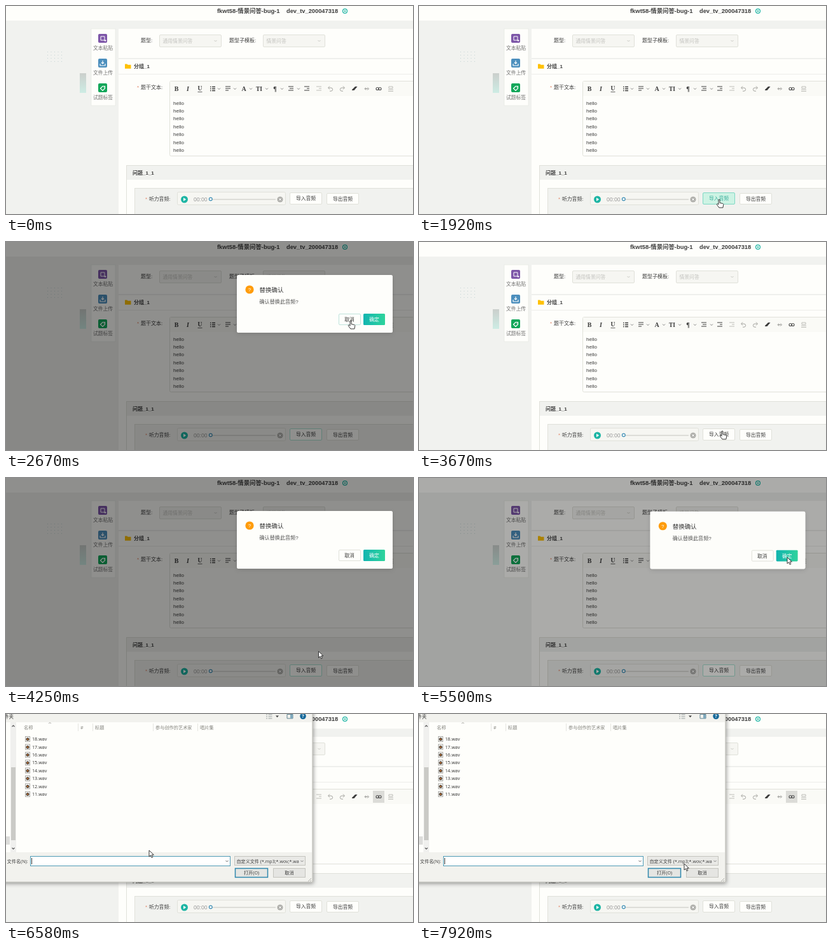
Animation, 640 px wide and 328 px high, one loop 8 s. Source, as an HTML page:

```html
<!DOCTYPE html>
<html>
<head>
<meta charset="utf-8">
<style>
html, body { margin: 0; width: 100%; height: 100%; overflow: hidden; background: #f1f2ef; }
svg { display: block; width: 640px; height: 328px; }
text { font-family: "Liberation Sans", "Noto Sans CJK SC", "Noto Sans CJK", sans-serif; white-space: pre; }
#dialog text { font-family: "Open Sans", "Noto Sans CJK SC", "Noto Sans CJK", sans-serif; }
</style>
</head>
<body>
<svg id="stage" viewBox="0 0 640 328" xmlns="http://www.w3.org/2000/svg"></svg>
<script>
const PAPER = '#fefefb', BACK = '#f1f2ef', EDGE = '#e0e1da', FIELD = '#f6f6f2', INK = '#3c3c3c', TEAL = '#1db5a4';
const LOOP = 8000;

const rect = (x, y, w, h, fill, more = '') =>
  `<rect x="${x}" y="${y}" width="${w}" height="${h}" fill="${fill}" ${more}/>`;
const box = (x, y, w, h, fill = PAPER, edge = EDGE, more = '') =>
  rect(x + .5, y + .5, w - 1, h - 1, fill, `stroke="${edge}" ${more}`);
const text = (x, y, s, size = 8, fill = INK, more = '') =>
  `<text x="${x}" y="${y}" font-size="${size}" fill="${fill}" ${more}>${s}</text>`;
const line = (d, color = INK, w = 1, more = '') =>
  `<path d="${d}" fill="none" stroke="${color}" stroke-width="${w}" ${more}/>`;
const disc = (x, y, r, fill, more = '') => `<circle cx="${x}" cy="${y}" r="${r}" fill="${fill}" ${more}/>`;
const chevron = (x, y, color = '#777', r = 2) =>
  line(`M${x - r} ${y - r / 2}l${r} ${r}l${r} ${-r}`, color, .9);
const group = (id, body, more = '') => `<g id="${id}" ${more}>${body}</g>`;
const bold = 'font-weight="700"', mid = 'text-anchor="middle"';

const bars = (x, color = INK, shift = 0) =>
  line(`M${x - 4} 127h8M${x - 4 + shift} 130h${8 - shift}M${x - 4} 133h${shift ? 8 : 5}`, color, 1.2);
const bullets = x =>
  line(`M${x - 4} 127.5h1.5m1.5 0h5M${x - 4} 130.5h1.5m1.5 0h5M${x - 4} 133.5h1.5m1.5 0h5`, INK, 1.3);

function header() {
  return rect(0, 0, 640, 23, PAPER) +
    text(332, 11, 'fkwt58-情景问答-bug-1', 9.4, INK, bold) +
    text(441, 11, 'dev_tv_200047318', 9.3, INK, bold) +
    disc(533, 8, 3.4, 'none', `stroke="${TEAL}" stroke-width="1.3"`) + disc(533, 8, 1.2, TEAL);
}

function sidebar() {
  let s = rect(134, 36, 38, 121, PAPER, `stroke="${EDGE}" stroke-width=".5"`);
  [['#7d56a8', '文本粘贴'], ['#4c8fbd', '文件上传'], ['#12a75a', '试题标签']].forEach(([color, label], i) => {
    const y = 44 + i * 39;
    s += rect(145, y, 14, 14, color, 'rx="2"') + text(152.5, y + 25, label, 7.8, '#737373', mid);
  });
  s += line('M149 48h6v6h-6zM156 53v3m-1.5-1.5h3', '#fff', 1);
  s += line('M148 91v3h8v-3M152 86v5m-2-2l2 2l2-2', '#fff', 1.1);
  s += line('M148.5 130l3.5-3.5h3.5v3.5l-3.5 3.5z', '#fff', 1.2) + disc(154, 128.3, .7, '#fff');
  for (let r = 0; r < 4; r++)
    for (let c = 0; c < 5; c++) s += rect(65 + c * 5.5, 72 + r * 5, 1, 1, '#c3d3d3');
  return s + rect(116, 106, 10, 31, 'url(#handle)');
}

function toolbar() {
  const pale = '#bdbdb8';
  const serif = 'font-weight="700" style="font-family:Liberation Serif,serif" text-anchor="middle"';
  let s = box(257, 118, 400, 119, PAPER, EDGE, 'rx="2"') + rect(258, 119, 382, 23, '#fafaf6') +
    group('hoverLink', rect(577, 121, 18, 19, '#dcdcd8'));
  s += text(268, 134, 'B', 10, INK, serif) + text(286, 134, 'I', 10, INK, serif + ' font-style="italic"') +
    text(305, 133, 'U', 9.5, INK, serif) + line('M301.5 135.5h7', INK, .8) +
    text(374, 134, 'A', 10, INK, serif) + text(398, 134, 'TI', 9.5, INK, serif) +
    text(423, 134, '¶', 10, INK, serif);
  s += bullets(325) + bars(349) + bars(448, INK, 2) + bars(473, INK, 4) + bars(492, pale, 4);
  for (const x of [335, 360, 385, 410, 434, 460]) s += chevron(x, 130.5);
  s += line('M507 129h4a2.6 2.6 0 0 1 0 5.2h-2M509 126.5l-2.5 2.5l2.5 2.5', '#a5a5a0') +
    line('M532 129h-4a2.6 2.6 0 0 0 0 5.2h2M530 126.5l2.5 2.5l-2.5 2.5', '#a5a5a0') +
    `<path d="M544 132l5-5h3.5l-5 6h-3.5z" fill="${INK}"/>` +
    line('M566 128.5l-2 2l2 2M568.5 128.5l2 2l-2 2M565 130.5h4', '#8c8c88') +
    disc(584, 130.5, 2, 'none', 'stroke="#555" stroke-width="1.2"') +
    disc(588, 130.5, 2, 'none', 'stroke="#555" stroke-width="1.2"') +
    line('M602 127h6v3h-6zM601 132h8M601 134.5h8', pale);
  for (let i = 0; i < 7; i++) s += text(263, 155.5 + i * 12.4, 'hello', 8);
  return s;
}

function form() {
  const hint = '#c2c2be';
  const select = (x, label) =>
    box(x, 45, 98, 20, FIELD, EDGE, 'rx="1.5"') + text(x + 5.5, 58, label, 7.8, hint) + chevron(x + 88.5, 55, hint);
  return rect(177, 36, 463, 46, PAPER) + rect(177, 84, 463, 244, PAPER) +
    line('M177 82.5H640M177 107.5H640', '#ededea') +
    text(212, 57, '题型:', 8) + text(351, 57, '题型子模板:', 8) +
    select(241, '通用情景问答') + select(404, '情景问答') +
    `<path d="M187 91.5h3.5l1 1.2h5v6h-9.5z" fill="#ffc107"/>` +
    text(201, 97.5, '分组_1', 8, INK, bold) +
    text(206, 131, '*', 8, '#e08060') + text(212, 131, '题干文本:', 8);
}

function question() {
  return box(189, 251, 470, 90) + rect(190, 252, 450, 22, BACK) +
    text(199, 265.5, '问题_1_1', 8, INK, bold) +
    box(202, 287, 450, 60, BACK) +
    text(219, 307, '*', 8, '#e08060') + text(225, 306.5, '听力音频:', 7.8) +
    box(269, 293, 171, 21, FIELD, EDGE, 'rx="2"') +
    disc(280.5, 305, 5.5, TEAL) + `<path d="M279 302.3l4.2 2.7l-4.2 2.7z" fill="#fff"/>` +
    text(295, 308, '00:00', 8.6, '#999') +
    line('M324 305H424', '#d4d4cf', 1.5) + disc(321.8, 304.5, 2.4, '#fff', 'stroke="#3f8fb5" stroke-width="1.2"') +
    disc(431, 305, 4.6, '#b0b0ac') + line('M429.4 303.4l3.2 3.2m0-3.2l-3.2 3.2', '#fff') +
    box(446, 294, 51, 19, PAPER, EDGE, 'rx="1.5" id="importBox"') +
    text(471.5, 306, '导入音频', 7.8, INK, mid + ' id="importText"') +
    box(504, 295, 51, 18, PAPER, EDGE, 'rx="1.5"') + text(529.5, 307, '导出音频', 7.8, INK, mid);
}

function modal() {
  return rect(363, 52, 245, 91, PAPER, 'rx="2.5" filter="url(#soft)"') +
    disc(383, 75, 6.6, '#ff9c0c') + text(383, 78, '?', 8, '#fff', mid) +
    text(398.5, 79, '替换确认', 9.5, '#333') + text(398.5, 97, '确认替换此音频?', 8.1, '#555') +
    box(523, 113, 35, 18, PAPER, EDGE, 'rx="1.5" id="cancelBox"') + text(540, 125, '取消', 7.8, INK, mid) +
    rect(562, 113, 34, 18, 'url(#ok)', 'rx="1.5"') + text(579, 125, '确定', 7.8, '#fff', mid);
}

function fileDialog() {
  const small = 7.2, gray = '#85857f';
  let s = rect(-10, -10, 492, 275, '#f2f2ee', 'stroke="#b8b8b2" filter="url(#deep)"') +
    rect(0, 13, 481, 205, PAPER) + text(-3, 7, '件夹', 7.5) +
    line('M409 1h2m1.5 0h6M409 4h2m1.5 0h6M409 7h2m1.5 0h6', '#98a0a0') +
    '<path d="M424 2.5h5l-2.5 3z" fill="#444"/>' +
    line('M442 0.5h9v6.5h-9z', '#5f8290') + rect(447, 1, 4, 6, '#7fa9bd') +
    disc(467, 3.5, 4.8, '#16699a') + text(467, 6.3, '?', 7.5, '#fff', mid + ' ' + bold);
  s += rect(0, 13, 6, 205, PAPER) + rect(0, 193, 6, 13, '#dddddb') +
    rect(7, 13, 9, 205, '#f0f0ee') + rect(8, 84, 7, 115, '#cacac6') +
    line('M9.5 20l2-2l2 2M9.5 211l2 2l2-2', '#555', 1.1);
  s += line('M113.5 15v12M136.5 15v12M231.5 15v12M301.5 15v12', '#e5e5e0') + line('M67 15l2-1.5l2 1.5', gray, .7);
  [[28, '名称'], [117, '#'], [140, '标题'], [235, '参与创作的艺术家'], [305, '唱片集']]
    .forEach(([x, label]) => s += text(x, 23.5, label, small, gray));
  s += rect(27, 0, 300, 12.4, '#e5f3fb', 'id="rowHover"');
  for (let i = 0; i < 8; i++) {
    const y = 39.5 + i * 12.4;
    s += box(30, y - 4.5, 8, 9, '#fff', '#a9a9a4') + disc(34, y + .3, 2.5, '#4c4034') + disc(34, y + .3, 1, '#f08a3c') +
      text(41, y + 2.7, `${18 - i}.wav`, small, '#333');
  }
  s += text(1.5, 234.5, '文件名(N):', small) +
    box(38, 224, 315, 16, '#fff', '#4e9ab5') + line('M40.5 227v10', '#222', .9) + chevron(347.5, 232, '#555') +
    box(359, 224, 112, 15, '#e9e9e6', '#c4c4be') + text(362.5, 234.5, '自定义文件 (*.mp3;*.wov;*.wa', 7.1) + chevron(465.5, 232) +
    box(360, 243, 52, 15, '#e5e5e2', '#2f87ad', 'stroke-width="1.5"') + text(386, 253, '打开(O)', small, INK, mid) +
    box(420, 243, 51, 15, '#e5e5e2', '#c4c4be') + text(445.5, 253, '取消', small, INK, mid);
  return s + line('M475 264l5-5M478 264l2-2', '#b0b0aa');
}

const defs = `<defs>
  <linearGradient id="handle" x2="0" y2="1"><stop stop-color="#cbcfcc"/><stop offset="1" stop-color="#cdece4"/></linearGradient>
  <linearGradient id="ok"><stop stop-color="#12b5b0"/><stop offset="1" stop-color="#2fd49c"/></linearGradient>
  <filter id="soft" x="-10%" y="-20%" width="120%" height="150%"><feDropShadow dx="0" dy="2" stdDeviation="3" flood-opacity=".12"/></filter>
  <filter id="deep"><feDropShadow dx="1" dy="2" stdDeviation="3" flood-opacity=".4"/></filter>
</defs>`;

const arrow = '<path d="M0 0v10l2.4-2.2l1.7 3.7l1.7-.8l-1.7-3.6h3.3z" fill="#fff" stroke="#222" stroke-width=".9"/>';
const hand = '<path d="M-1 1c0-1.5 2-1.5 2 0v4.5l4.5 1c1.2.3 1.4 1 1.2 2l-.8 4.5h-6l-3.4-4.6c-.8-1.2.7-2 1.5-1.2l1 1z" fill="#fff" stroke="#222" stroke-width=".9"/>';

document.getElementById('stage').innerHTML = defs + rect(0, 0, 640, 328, BACK) +
  header() + sidebar() + form() + toolbar() + question() +
  group('mask', rect(0, 0, 640, 328, '#000', 'fill-opacity=".44"')) +
  group('modal', modal()) + group('dialog', fileDialog()) +
  group('cursor', group('arrow', arrow) + group('hand', hand));

const el = {};
for (const node of document.querySelectorAll('[id]')) el[node.id] = node;
const show = (node, on) => node.style.display = on ? '' : 'none';
const set = (node, attr, value) => node.setAttribute(attr, value);
const clamp = v => Math.max(0, Math.min(1, v));
const ramp = (t, from, span) => clamp((t - from) / span);

// time, x, y
const path = [
  [900, 548, 330], [1330, 472, 305], [2080, 472, 305], [2560, 542, 124], [2860, 542, 124],
  [3500, 477, 298], [4080, 477, 298], [4800, 579, 125], [6150, 579, 125], [6530, 225, 215],
  [7000, 225, 215], [7350, 160, 75], [7750, 180, 112], [7920, 417, 236]
];
// opening and closing times of the confirm box
const shows = [[2000, 2780], [4000, 5450]];

function pointer(t) {
  const i = path.findIndex(p => p[0] > t);
  if (i < 0) return path[path.length - 1].slice(1);
  if (!i) return [-50, -50];
  const [t0, x0, y0] = path[i - 1], [t1, x1, y1] = path[i];
  const k = (t - t0) / (t1 - t0), e = k * k * (3 - 2 * k);
  return [x0 + (x1 - x0) * e, y0 + (y1 - y0) * e];
}

const inside = (x, y, l, top, r, b) => x >= l && x <= r && y >= top && y <= b;

function draw() {
  const t = performance.now() % LOOP;
  const [x, y] = pointer(t);
  const open = shows.find(([a, b]) => t >= a && t < b + 200);
  const dialogOpen = t >= 6100;

  show(el.mask, open);
  show(el.modal, open);
  if (open) {
    const grow = ramp(t, open[0], 200), fade = ramp(t, open[1], 200);
    const scale = 1 - .8 * (1 - grow) ** 3 - .8 * fade ** 4;
    set(el.mask, 'opacity', grow * (1 - fade));
    set(el.modal, 'opacity', grow * (1 - fade ** 4));
    set(el.modal, 'transform', `translate(476 303) scale(${scale}) translate(-476 -303)`);
  }

  const onImport = !open && (t >= 1280 && t < 2000 || t >= 3750 && t < 4000);
  set(el.importBox, 'fill', onImport ? '#cdf3e4' : PAPER);
  set(el.importBox, 'stroke', onImport ? '#7fd8c4' : open ? '#a8e2d2' : EDGE);
  set(el.importText, 'fill', onImport ? '#3bae9c' : INK);
  set(el.cancelBox, 'stroke', open && inside(x, y, 523, 113, 558, 131) ? '#bfe3dc' : EDGE);
  show(el.hoverLink, t >= 5650);

  show(el.dialog, dialogOpen);
  const row = Math.floor((y - 33.3) / 12.4);
  const onRow = dialogOpen && row >= 0 && row < 8 && x > 27 && x < 327;
  show(el.rowHover, onRow);
  if (onRow) set(el.rowHover, 'y', 33.3 + row * 12.4);

  const isHand = inside(x, y, 446, 294, 555, 314) && !dialogOpen ||
    open && t < open[1] && inside(x, y, 523, 113, 596, 131);
  show(el.hand, isHand);
  show(el.arrow, !isHand);
  set(el.cursor, 'transform', `translate(${x} ${y})`);
  requestAnimationFrame(draw);
}
draw();
</script>
</body>
</html>
```
